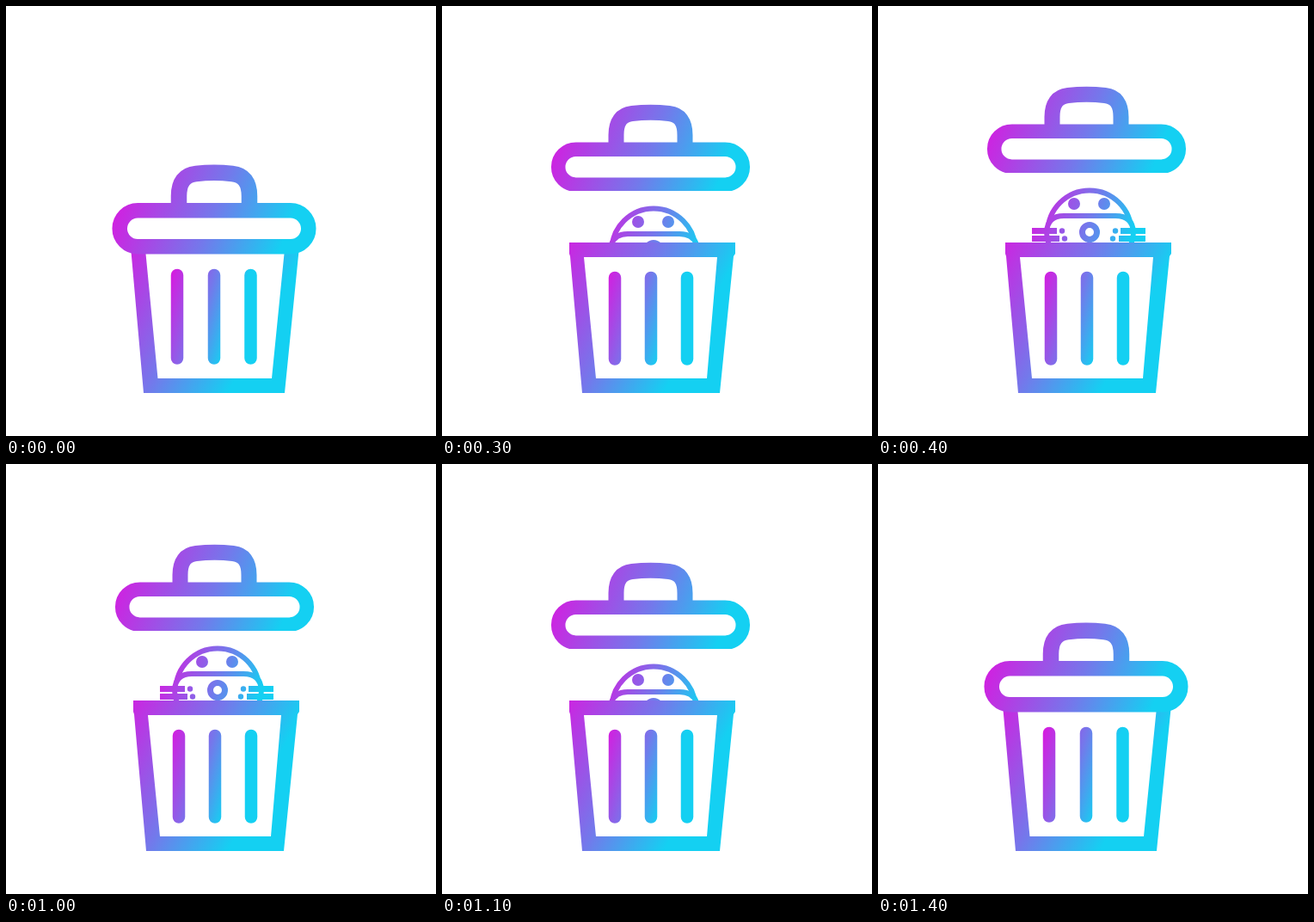
Recreate the animation shown at these times as an HTML page. Size 500x500 px, loop 1500 ms.

```html
<!DOCTYPE html>
<html lang="en">
<head>
<meta charset="utf-8">
<title>Bin with a seal</title>
<style>
  html, body { margin: 0; width: 100%; height: 100%; overflow: hidden; background: #fff; }
  svg { display: block; width: 100%; height: 100%; }
</style>
</head>
<body>
<svg viewBox="0 0 500 500" fill="none">
  <defs>
    <linearGradient id="ramp" gradientUnits="userSpaceOnUse">
      <stop offset="0" stop-color="#d31ee0"/>
      <stop offset=".5" stop-color="#7478eb"/>
      <stop offset=".9" stop-color="#14d0f2"/>
    </linearGradient>
    <linearGradient id="lidInk" href="#ramp" x1="135" y1="160" x2="340" y2="240"/>
    <linearGradient id="binInk" href="#ramp" x1="140" y1="270" x2="325" y2="370"/>
    <linearGradient id="barInk" href="#ramp" x1="194" y1="310" x2="285" y2="338"/>
    <linearGradient id="sealInk" href="#ramp" x1="182" y1="195" x2="308" y2="240"/>
    <clipPath id="flatBase"><rect x="100" y="100" width="300" height="136"/></clipPath>
    <clipPath id="aboveRim"><rect width="500" height="278"/></clipPath>
  </defs>

  <g id="open">
    <g clip-path="url(#aboveRim)">
      <g id="seal" stroke="url(#sealInk)" stroke-width="6">
        <path d="M204 253Q192 265 186 279M288 253Q298 265 304 279"/>
        <path d="M197.5 231A48.5 48.5 0 1 1 294.5 231" fill="#fff"/>
        <path d="M227 262Q246 276 266 262M236 256Q246 263 256 256"/>
        <path d="M246 244C238 264 198 272 196 231Q197 212 216 212H276Q296 212 297 231C295 272 254 264 246 244Z" fill="#fff"/>
        <circle cx="246" cy="231" r="8.5" stroke-width="7"/>
        <path stroke-width="7" d="M179 229.5h29M179 238.5h32M179 247.5h35M282 229.5h29M280 238.5h31M277 247.5h34"/>
        <g fill="url(#sealInk)" stroke="none">
          <circle cx="228" cy="198" r="7"/><circle cx="263" cy="198" r="7"/>
          <circle cx="214" cy="229.5" r="3.2"/><circle cx="276" cy="229.5" r="3.2"/>
          <circle cx="217" cy="238.5" r="3.2"/><circle cx="273" cy="238.5" r="3.2"/>
          <circle cx="220.500" cy="247.5" r="3.2"/><circle cx="270.500" cy="247.5" r="3.2"/>
        </g>
      </g>
    </g>
    <g id="lid">
      <g clip-path="url(#flatBase)" stroke="url(#lidInk)">
        <path stroke-width="18" d="M202.500 184V171Q202.500 148 221 146Q242.500 143.500 264 146Q282.500 148 282.500 171V184"/>
        <rect x="135.200" y="187.700" width="214.600" height="41" rx="20.500" stroke-width="16.500" fill="#fff"/>
      </g>
    </g>
    <path fill="#fff" d="M150 277H339L322 448H164Z"/>
    <path fill="url(#binInk)" fill-rule="evenodd" d="M148 275H341V288L339 291L323 450H163L149 291L148 288ZM165 292L179 433H308L320 292Z"/>
    <path stroke="url(#barInk)" stroke-width="14.500" stroke-linecap="round" d="M201 316V410.500M243 316V410.500M285 316V410.500"/>
  </g>

  <g id="closed">
    <path fill="url(#binInk)" fill-rule="evenodd" d="M145 280H341L324 450H160ZM162.500 288L176.500 433H309L323.500 288Z"/>
    <path stroke="url(#barInk)" stroke-width="14.500" stroke-linecap="round" d="M199 313V409.500M242 313V409.500M284.500 313V409.500"/>
    <g transform="translate(0 50)" stroke="url(#lidInk)">
      <path stroke-width="18.500" d="M201 184V171Q201 147 221 145Q242 142.500 263 145Q283 147 283 171V184"/>
      <rect x="132.200" y="187.800" width="219.600" height="42" rx="21" stroke-width="17.500" fill="#fff"/>
    </g>
  </g>
</svg>
<script>
  const LOOP = 1500;
  const FULL_LIFT = 74;
  // [start ms, lift in px]; null means the lid is shut
  const poses = [
    [0, null], [100, 0], [300, 21], [400, 42], [500, FULL_LIFT],
    [1000, 42], [1100, 21], [1200, 0], [1400, null]
  ];
  const [open, closed, lid, seal] =
    ['open', 'closed', 'lid', 'seal'].map(id => document.getElementById(id));
  const shiftY = (node, y) => node.setAttribute('transform', `translate(0 ${y})`);
  const show = (node, visible) => node.setAttribute('display', visible ? 'inline' : 'none');

  function draw(now) {
    const time = now % LOOP;
    const lift = poses.findLast(([start]) => start <= time)[1];
    show(closed, lift === null);
    show(open, lift !== null);
    if (lift !== null) {
      shiftY(lid, -lift);
      shiftY(seal, FULL_LIFT - lift);
    }
  }

  const began = performance.now();
  function tick() {
    draw(performance.now() - began);
    requestAnimationFrame(tick);
  }
  tick();
</script>
</body>
</html>
```
